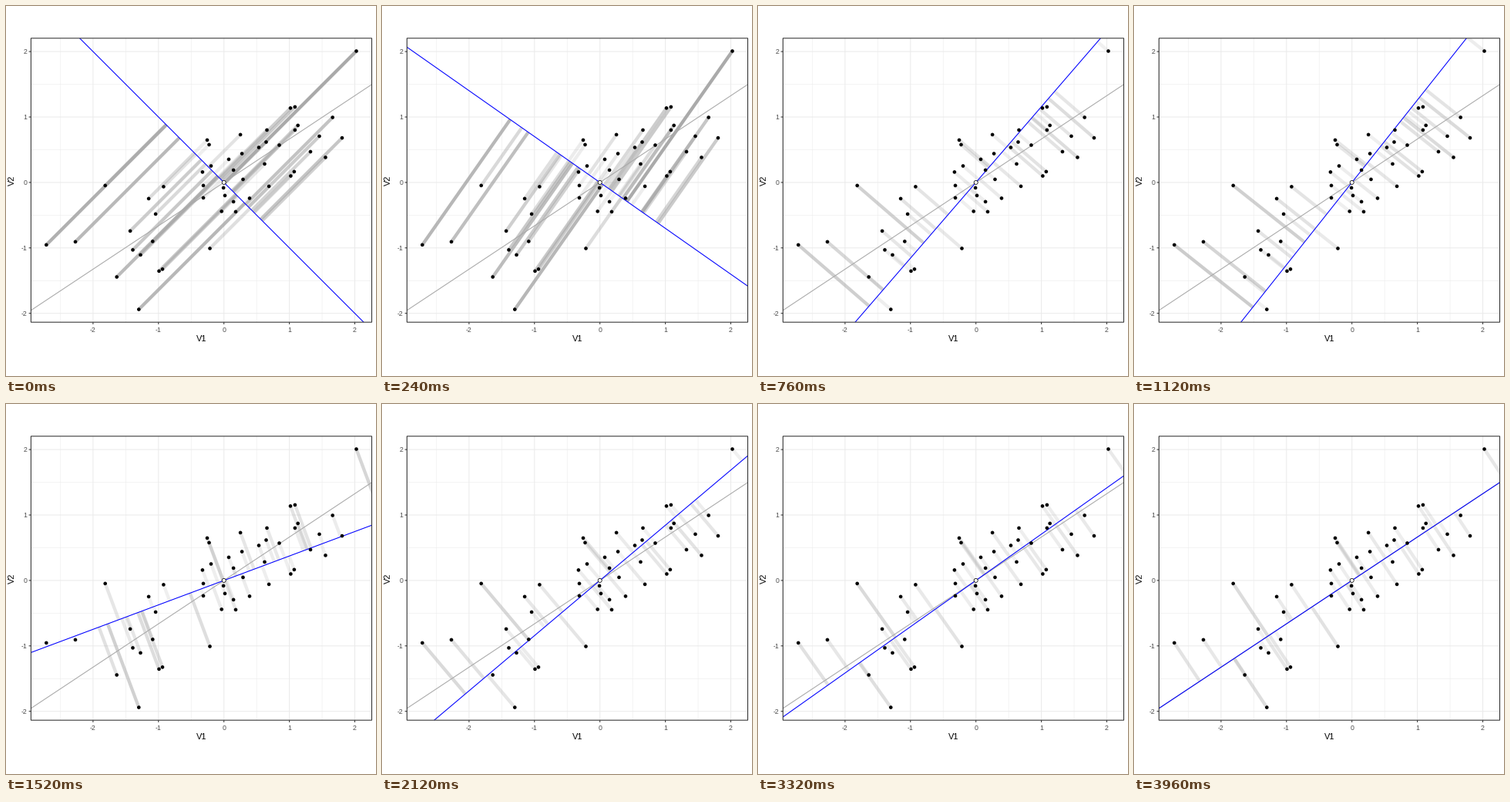
A matplotlib script for the animation above (4 s loop, 480 by 480 pixels).

```python
import numpy as np
import matplotlib
import matplotlib.pyplot as plt
from matplotlib.animation import FuncAnimation
from matplotlib.collections import LineCollection
from matplotlib.patches import Circle, Rectangle

matplotlib.rcParams["path.snap"] = False
matplotlib.rcParams["font.family"] = "Liberation Sans"
matplotlib.rcParams["axes.unicode_minus"] = False

SIZE, FRAMES, STEPS = 480, 100, 121
PX = 0.72                       # one pixel in points at 100 dpi
UNIT = 84.9                     # pixels per data unit
CX, CY = 282.7, 228.9           # data origin on the stage
LEFT, RIGHT, TOP, BOTTOM = 32.4, 474.5, 41.8, 410.2
LINE = 1.07

# Cloud of points as pixel offsets from the origin, y upwards
CLOUD = np.array([
    (-230.4, -81), (-192.7, -77), (-154, -4), (-139, -122.6), (-110.4, -164.7),
    (-121.6, -63), (-118.2, -87.5), (-108.2, -94), (-92.4, -76.5), (-88.6, -41),
    (-97.6, -21), (-78.3, -5.5), (-84.2, -115), (-79.7, -112.5), (-18.2, -85.6),
    (-21.7, 55), (-19.2, 49), (-16.7, 21.4), (-27.8, 13.5), (-26.7, -4),
    (-26.7, -20), (-0.6, -7), (1.3, -17), (-3, -37.5), (15.3, -38),
    (12.4, -25), (24.8, 4), (12.4, 16), (6.3, 30), (21.4, 62),
    (23.4, 37.4), (33.3, -20.5), (58.4, -5), (52.8, 24), (45.3, 45.4),
    (54.8, 52.4), (55.8, 68), (71.8, 48.4), (86.3, 96.5), (92.2, 98),
    (96, 74), (92.2, 68), (86.7, 8.4), (91.2, 14), (112.3, 39.9),
    (123.8, 60), (131.8, 32.5), (141, 84.4), (153.3, 57.8), (171.8, 170.4),
])
X = CLOUD / UNIT


def axes_at(deg):
    a = np.radians(deg)
    return np.array([np.cos(a), np.sin(a)]), np.array([-np.sin(a), np.cos(a)])


def swing():
    """Angle of a damped rod pulled by springs towards the points."""
    angle, omega, path = -45.0, 0.0, [-45.0]
    for _ in range(STEPS):
        w, n = axes_at(angle)
        omega = 0.93 * (omega + np.sum((X @ w) * (X @ n)))
        angle += omega / 40
        path.append(angle)
    return path


scatter = X.T @ X
REST = np.degrees(0.5 * np.arctan2(2 * scatter[0, 1], scatter[0, 0] - scatter[1, 1]))
ANGLES = np.interp(np.arange(FRAMES) * STEPS / (FRAMES - 1),
                   np.arange(STEPS + 1), swing())
ANGLES[-1] = REST               # the rod settles on the main axis
MAX_LEN = np.max(np.abs(X @ axes_at(-45)[1]))


def stage(p):
    return np.array([CX, CY]) + np.asarray(p) * [UNIT, -UNIT]


fig = plt.figure(figsize=(4.8, 4.8), dpi=100, facecolor="white")
ax = fig.add_axes([0, 0, 1, 1])
ax.set_xlim(0, SIZE)
ax.set_ylim(SIZE, 0)
ax.axis("off")
panel = Rectangle((LEFT, TOP), RIGHT - LEFT, BOTTOM - TOP, transform=ax.transData)


def line(xs, ys, color, width, z, clip=False):
    item, = ax.plot(xs, ys, color=color, lw=width * PX, zorder=z,
                    solid_capstyle="butt")
    if clip:
        item.set_clip_path(panel)
    return item


def grid(values, width, z):
    for v in values:
        x, y = stage((v, v))
        if LEFT < x < RIGHT:
            line([x, x], [TOP, BOTTOM], "#ebebeb", width, z)
        if TOP < y < BOTTOM:
            line([LEFT, RIGHT], [y, y], "#ebebeb", width, z)


def label(x, y, text, size, color, **kw):
    ax.text(x, y, text, fontsize=size * PX, color=color, **kw)


def rod(deg):
    w = axes_at(deg)[0]
    return stage([-8 * w, 8 * w]).T


grid(np.arange(-2.5, 2.6), LINE / 2, 1)
grid(range(-2, 3), LINE, 2)

for v in range(-2, 3):
    x, y = stage((v, v))
    line([x, x], [BOTTOM, BOTTOM + 2.75], "#333333", LINE, 2)
    line([LEFT - 2.75, LEFT], [y, y], "#333333", LINE, 2)
    label(x, 423, str(v), 8.8, "#4d4d4d", ha="center", va="baseline")
    label(27.4, y + 3.2, str(v), 8.8, "#4d4d4d", ha="right", va="baseline")

label((LEFT + RIGHT) / 2, 435, "V1", 11, "black", ha="center", va="baseline")
label(13.4, (TOP + BOTTOM) / 2, "V2", 11, "black", rotation=90,
      ha="right", va="center")

line(*rod(REST), "#a9a9a9", LINE, 3, clip=True)
springs = LineCollection([], linewidths=4.27 * PX, capstyle="butt", zorder=4)
ax.add_collection(springs, autolim=False)
springs.set_clip_path(panel)
blue = line([], [], "#0000ff", LINE, 5, clip=True)

for p in stage(X):
    ax.add_patch(Circle(p, 2.3, fc="black", ec="none", zorder=6))
ax.add_patch(Circle((CX, CY), 2.5, fc="white", ec="black", lw=0.75 * PX, zorder=7))
ax.add_patch(Rectangle((LEFT, TOP), RIGHT - LEFT, BOTTOM - TOP, fill=False,
                       ec="#333333", lw=LINE * PX, zorder=8))


def draw(i):
    w, n = axes_at(ANGLES[i])
    feet = np.outer(X @ w, w)
    strength = 0.1 + 0.9 * np.abs(X @ n) / MAX_LEN
    colors = np.full((len(X), 4), 169 / 255)
    colors[:, 3] = np.clip(strength, 0, 1)
    springs.set_segments(list(np.stack([stage(X), stage(feet)], axis=1)))
    springs.set_color(colors)
    blue.set_data(*rod(ANGLES[i]))
    return springs, blue


anim = FuncAnimation(fig, draw, frames=FRAMES, interval=40, repeat=True,
                     repeat_delay=0, init_func=lambda: draw(0), blit=False)
plt.show()
```
